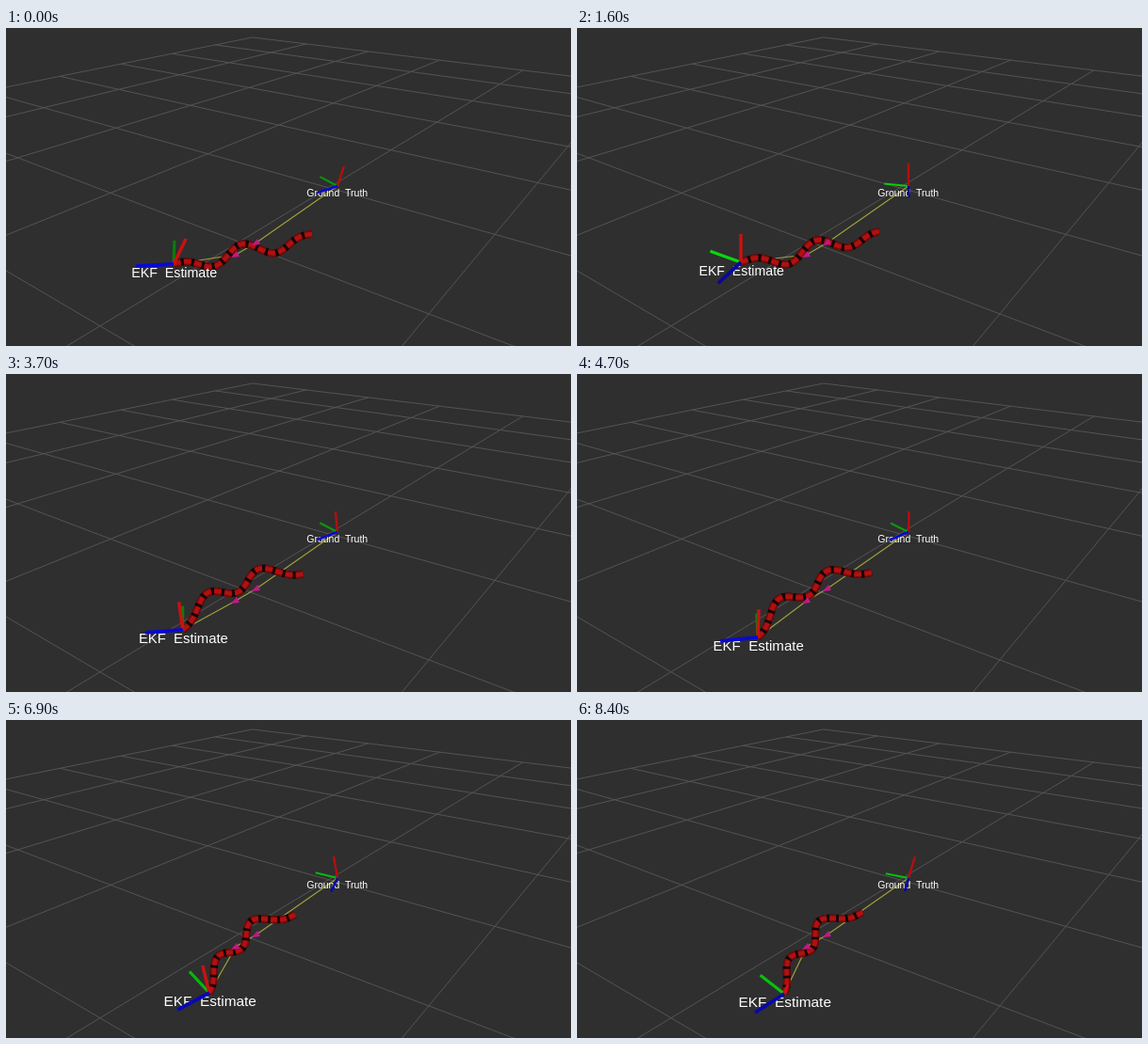
Write an HTML page with a canvas that moves like this. It is 600x338 px and loops after 8500 ms.

```html
<!DOCTYPE html>
<html lang="en">
<head>
<meta charset="utf-8">
<title>Pose estimate</title>
<style>
  html, body { margin: 0; width: 100%; height: 100%; overflow: hidden; background: #2f2f2f; }
  canvas { display: block; width: 100vw; height: 100vh; }
</style>
</head>
<body>
<canvas id="stage" width="600" height="338"></canvas>
<script>
const ctx = document.getElementById('stage').getContext('2d');
const LOOP = 8500, STEP = 100;
const TRUTH = [352, 168];
const WAYPOINTS = [[266, 228], [244, 241]];

// x, y: estimate origin; swing 0..1: roll of the frames;
// lean: tilt of the red bar in degrees; bend: side to which the snake curves.
const keys = [
  { at: 0, x: 178, y: 251, swing: 0, lean: 26, bend: 1 },
  { at: 1600, x: 174, y: 249, swing: 0.8, lean: 0, bend: 1 },
  { at: 2800, x: 184, y: 265, swing: 0, lean: -16, bend: -1 },
  { at: 4700, x: 192, y: 280, swing: 0.05, lean: 2, bend: -1 },
  { at: 5900, x: 188, y: 269, swing: 1, lean: -2, bend: 1 },
  { at: 6900, x: 216, y: 290, swing: 0.5, lean: -14, bend: -1 },
  { at: 8400, x: 220, y: 291, swing: 0.6, lean: 24, bend: -1 }
];

const mix = (a, b, u) => a + (b - a) * u;

function poseAt(time) {
  const next = Math.max(1, keys.findIndex(key => key.at >= time));
  const a = keys[next - 1], b = keys[next];
  const u = (time - a.at) / (b.at - a.at), eased = u * u * (3 - 2 * u);
  const pose = {};
  for (const name in a) pose[name] = mix(a[name], b[name], eased);
  return pose;
}

function polyline(points, color, width) {
  ctx.beginPath();
  points.forEach(p => ctx.lineTo(...p));
  ctx.strokeStyle = color;
  ctx.lineWidth = width;
  ctx.stroke();
}

// Ground vertex in perspective: each line family meets the horizon in one point.
function gridPoint(i, j) {
  const horizon = -95, right = 780, left = -600;
  const a = 4.94 - 0.822 * j, b = 8.21 - 0.93 * i;
  const depth = (right - left) / (a + b);
  return [left + b * depth, horizon + depth];
}

function drawGrid() {
  const far = 10;
  for (let k = 0; k <= far; k++) {
    polyline([gridPoint(0, k), gridPoint(Math.min(far, 13 - k), k)], '#545454', 1);
    polyline([gridPoint(k, 0), gridPoint(k, Math.min(far, 13 - k))], '#545454', 1);
  }
}

function snakeCurve({ x, y, swing, bend }, progress) {
  const head = [mix(325, 303, progress), mix(219, 204, progress)];
  const dx = head[0] - x, dy = head[1] - y, chord = Math.hypot(dx, dy);
  return Array.from({ length: 61 }, (_, n) => {
    const u = n / 60;
    const wave = Math.cos(4 * Math.PI * (u - 0.07 * swing * bend));
    const side = Math.sin(Math.PI * u) * (-8.5 + bend * (13.5 - 10.5 * wave));
    return [x + dx * u - dy / chord * side, y + dy * u + dx / chord * side];
  });
}

function drawSnake(curve) {
  const length = curve.slice(1).reduce((sum, p, i) =>
    sum + Math.hypot(p[0] - curve[i][0], p[1] - curve[i][1]), 0);
  const unit = length / 14.7;
  polyline(curve, '#160606', 8);
  ctx.setLineDash([unit * 0.7, unit * 0.3]);
  polyline(curve, '#760b0b', 8);
  polyline(curve, '#b01111', 4.5);
  ctx.setLineDash([]);
}

function drawArrow([x, y]) {
  ctx.fillStyle = '#c2188a';
  ctx.beginPath();
  ctx.moveTo(x - 5, y + 3);
  ctx.lineTo(x + 1, y - 4);
  ctx.lineTo(x + 4, y + 2);
  ctx.fill();
}

function drawBar([x, y], degrees, length, color, width) {
  const angle = degrees * Math.PI / 180;
  const tip = [x + length * Math.cos(angle), y - length * Math.sin(angle)];
  polyline([[x, y], tip], color, width);
}

function drawTruthAxes({ swing, lean }) {
  drawBar(TRUTH, 152 + 28 * swing, 21 + 6 * swing, `rgb(8,${150 + 70 * swing},12)`, 2.2);
  drawBar(TRUTH, 90 - lean * 0.7, 22 + 3 * swing, '#b01010', 2.5);
  drawBar(TRUTH, 198 + 95 * swing, 23 - 14 * swing, `rgb(8,8,${215 - 80 * swing})`, 2.5);
}

function drawEstimateAxes({ x, y, swing, lean }) {
  const origin = [x, y];
  const upright = 1 - swing * Math.max(0, lean) / 22;
  drawBar(origin, 88 + 90 * swing, 25 + 12 * swing, `rgb(8,${125 + 115 * swing},12)`, 3.2);
  drawBar(origin, 90 - lean, 30 * upright, '#c81212', 3.5);
  drawBar(origin, 183 + 50 * swing, 40 - 14 * swing ** 3, `rgb(8,8,${215 - 70 * swing})`, 3.8);
}

function drawLabel(text, x, y, size) {
  ctx.font = `${size}px "Liberation Sans", Arial, sans-serif`;
  ctx.textAlign = 'center';
  ctx.fillStyle = '#fff';
  ctx.fillText(text, x, y + size * 0.35);
}

function render(time) {
  const pose = poseAt(time);
  const origin = [pose.x, pose.y];
  ctx.fillStyle = '#2f2f2f';
  ctx.fillRect(0, 0, 600, 338);
  drawGrid();
  polyline([TRUTH, ...WAYPOINTS, origin], '#a09e3c', 1.2);
  drawSnake(snakeCurve(pose, time / LOOP));
  WAYPOINTS.forEach(drawArrow);
  drawLabel('Ground\u00a0 Truth', 351.7, 175.3, 10.5);
  drawLabel('EKF\u00a0 Estimate', pose.x + 0.7, pose.y + 9, 14.2 + (pose.y - 250) * 0.03);
  drawTruthAxes(pose);
  drawEstimateAxes(pose);
}

const start = performance.now();
function tick() {
  const time = (performance.now() - start) % LOOP;
  render(Math.floor(time / STEP) * STEP);
  requestAnimationFrame(tick);
}
tick();
</script>
</body>
</html>
```
